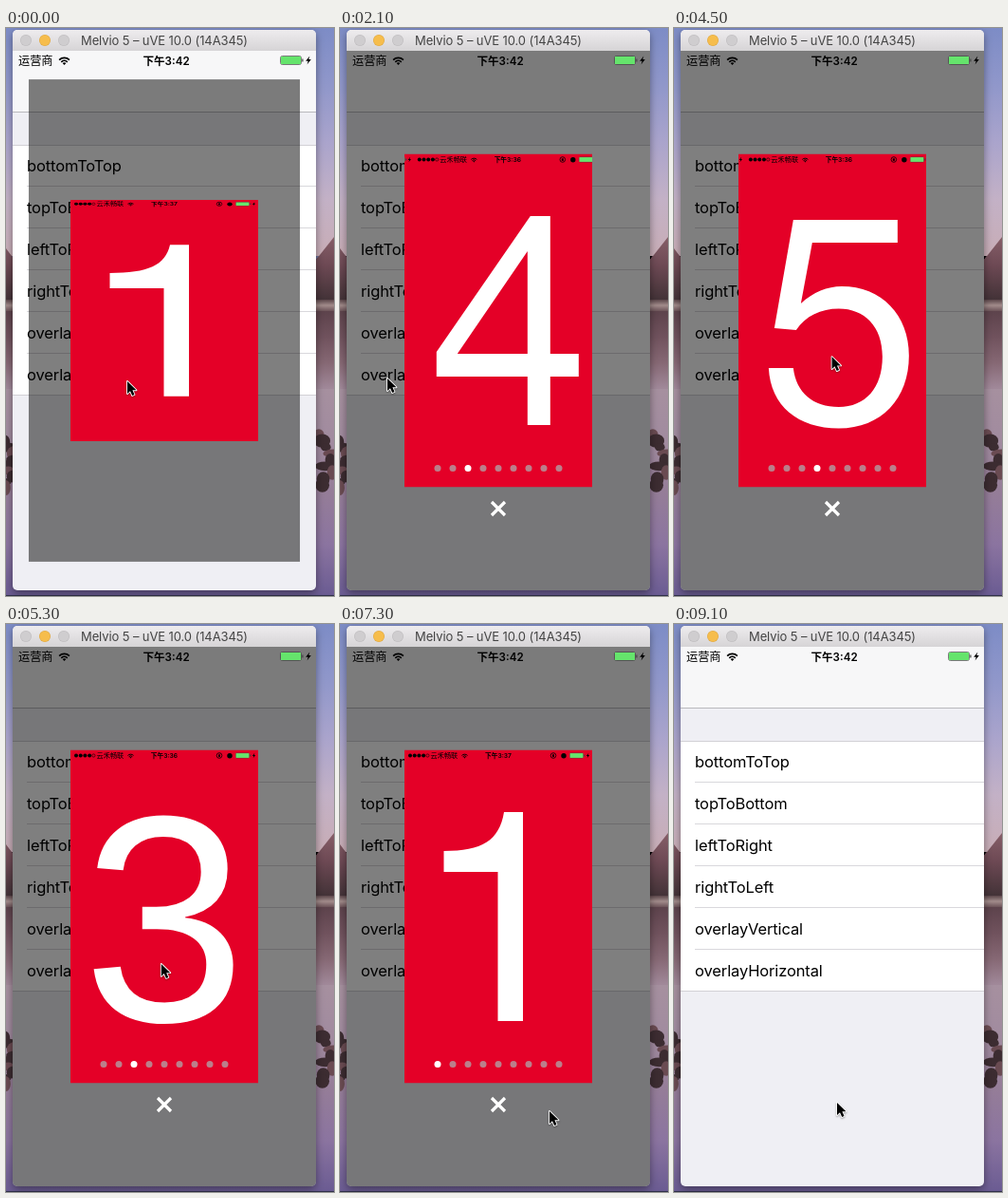
Animation, 346 px wide and 598 px high, one loop 9500 ms. Source, as an HTML page with a canvas:

```html
<!DOCTYPE html>
<html>
<head>
<meta charset="utf-8">
<style>
html, body { margin: 0; width: 100%; height: 100%; overflow: hidden; background: #8088b8; }
canvas { display: block; width: 346px; height: 598px; }
</style>
</head>
<body>
<canvas id="stage"></canvas>
<script>
const W = 346, H = 598, LOOP = 9500, STEP = 100;
const canvas = document.getElementById('stage');
const ctx = canvas.getContext('2d');
const dpr = window.devicePixelRatio || 1;
canvas.width = W * dpr;
canvas.height = H * dpr;

const SANS = 'Inter, "Noto Sans CJK SC", sans-serif';
const CJK = '"Noto Sans CJK SC", "Noto Sans CJK", sans-serif';
const CX = 167, CY = 308;
const PAGE = { x: 68, y: 132.5, w: 198, h: 351 };
const ROWS = ['bottomToTop', 'topToBottom', 'leftToRight', 'rightToLeft', 'overlayVertical', 'overlayHorizontal'];

const DIGITS = {
  1: new Path2D('M193 198H173C168 228 150 239 109.5 239V261H166.5V418H193Z'),
  4: new Path2D('M212 198H191L92 341V367H188V418H212V367H242V343H212ZM188 235V343H114Z'),
  5: new Path2D('M119 202H229V226H139L127 290C140 278 155 272 170 272C212 272 241 302 241 345' +
    'C241 390 212 421.5 167 421.5C124 421.5 95 398 93 358H119C122 384 140 399 167 399' +
    'C195 399 213 379 213 346C213 314 194 295.5 167 295.5C148 295.5 132 303 122 318L99 316Z')
};
const ARROW = new Path2D('M0 0V13L3 10.2L5.2 15L7.5 14L5.4 9.3H9.5Z');
const BOLT = new Path2D('M1.4 -4.5L-2.8 .8H-.3L-1.4 4.5L2.8 -1H.3Z');

const clamp = v => Math.max(0, Math.min(1, v));
const ease = u => .5 - .5 * Math.cos(Math.PI * clamp(u));

// Four swipes forward, ever slower, then four quick ones back
const SWIPE_MS = 420;
const forward = i => 690 + 225 * i + 150 * i * i;
const back = i => 4450 + 430 * i;
const turns = [0, 1, 2, 3];

const POINTER = [
  [0, 128, 372],
  ...turns.flatMap(i => [[forward(i), 228, 367], [forward(i) + 360, 50, 369]]),
  [3200, 230, 347],
  ...turns.flatMap(i => [[back(i), 160, 346 + 6 * i], [back(i) + 340, 285, 348 + 6 * i]]),
  [6200, 294, 371], [7300, 221, 513], [7800, 172, 504], [LOOP, 172, 504]
];

function scrollAt(t) {
  const progress = start => ease((t - start) / SWIPE_MS);
  return turns.reduce((p, i) => p + progress(forward(i)) - progress(back(i)), 0);
}

function pointerAt(t) {
  const i = Math.max(1, POINTER.findIndex(k => k[0] >= t));
  const [t0, x0, y0] = POINTER[i - 1], [t1, x1, y1] = POINTER[i];
  const u = ease((t - t0) / (t1 - t0));
  return [x0 + (x1 - x0) * u, y0 + (y1 - y0) * u];
}

function opennessAt(t) {
  if (t < 300) return 1 - .276 * (1 - t / 300) ** 2;
  return 1 - clamp((t - 8700) / 400) ** 2;
}

function rect(x, y, w, h, fill) {
  ctx.fillStyle = fill;
  ctx.fillRect(x, y, w, h);
}

function disc(x, y, r, fill) {
  ctx.fillStyle = fill;
  ctx.beginPath();
  ctx.arc(x, y, r, 0, 7);
  ctx.fill();
}

function ring(x, y, r, width) {
  ctx.strokeStyle = '#000';
  ctx.lineWidth = width;
  ctx.beginPath();
  ctx.arc(x, y, r, 0, 7);
  ctx.stroke();
}

function round(x, y, w, h, r) {
  ctx.beginPath();
  ctx.roundRect(x, y, w, h, r);
}

function text(s, x, y, font, fill = '#000', align = 'left', spacing = 0) {
  ctx.font = font;
  ctx.fillStyle = fill;
  ctx.textAlign = align;
  ctx.letterSpacing = spacing + 'px';
  ctx.fillText(s, x, y);
}

function gradient(y0, y1, ...colors) {
  const g = ctx.createLinearGradient(0, y0, 0, y1);
  colors.forEach((color, i) => g.addColorStop(i / (colors.length - 1), color));
  return g;
}

function place(x, y, k, paint) {
  ctx.save();
  ctx.translate(x, y);
  ctx.scale(k, k);
  paint();
  ctx.restore();
}

function wifi(x, y, k) {
  const from = -Math.PI * .75, to = -Math.PI * .25;
  place(x, y, k, () => {
    ctx.strokeStyle = ctx.fillStyle = '#000';
    ctx.lineWidth = 1.8;
    for (const r of [4.8, 8]) {
      ctx.beginPath();
      ctx.arc(0, 0, r, from, to);
      ctx.stroke();
    }
    ctx.beginPath();
    ctx.moveTo(0, 0);
    ctx.arc(0, 0, 2.8, from, to);
    ctx.fill();
  });
}

function bolt(x, y, k) {
  place(x, y, k, () => {
    ctx.fillStyle = '#000';
    ctx.fill(BOLT);
  });
}

function battery(x, y, w, h) {
  const inset = h / 10;
  round(x + .5, y + .5, w - 1, h - 1, h / 5);
  ctx.strokeStyle = '#444';
  ctx.lineWidth = .7;
  ctx.stroke();
  rect(x + inset, y + inset, w - 2 * inset, h - 2 * inset, '#65e46c');
  rect(x + w + .3, y + h * .35, 1.2, h * .3, '#444');
}

function rocks(x, y, count, seed) {
  const random = () => (seed = seed * 16807 % 2147483647) / 2147483647;
  for (let i = 0; i < count; i++) {
    ctx.fillStyle = i % 3 ? '#3c2c31' : '#6a4b52';
    ctx.beginPath();
    ctx.ellipse(x + 16 * (random() - .5), y + 60 * i / count, 5 + 7 * random(), 4 + 4 * random(), 0, 0, 7);
    ctx.fill();
  }
}

// Lake at dusk, seen only beside the window
function desktop() {
  rect(0, 0, W, 240, gradient(0, 240, '#7d8cc6', '#9097ca', '#aaa4cc', '#c3b1c6', '#c8adb6'));
  ctx.fillStyle = gradient(215, 285, '#8a626b', '#6d4954', '#443338');
  ctx.beginPath();
  ctx.moveTo(0, 232);
  ctx.lineTo(9, 244);
  ctx.lineTo(327, 244);
  ctx.lineTo(346, 220);
  ctx.lineTo(346, 286);
  ctx.lineTo(0, 286);
  ctx.fill();
  rect(0, 286, W, 12, gradient(286, 298, '#5b464a', '#a28c8b', '#6d5459'));
  rect(0, 298, W, 82, gradient(298, 380, '#5d434c', '#70525d', '#866874', '#a1899a'));
  rect(0, 380, W, 218, gradient(380, 598, '#a6909f', '#a18b9f', '#957d98', '#8b74a0', '#6a5b92'));
  rocks(338, 428, 9, 31);
  rocks(2, 430, 10, 77);
  rect(0, 597, W, 1, '#30304a');
}

function windowFrame() {
  ctx.save();
  ctx.shadowColor = 'rgba(0,0,0,.4)';
  ctx.shadowBlur = 9 * dpr;
  ctx.shadowOffsetY = 3 * dpr;
  round(7, 2, 320, 590, 5);
  ctx.fillStyle = '#efeff4';
  ctx.fill();
  ctx.restore();
  round(7, 2, 320, 22, [5, 5, 0, 0]);
  ctx.fillStyle = gradient(2, 24, '#eeecee', '#d6d4d6');
  ctx.fill();
  ['#cfcdcf', '#f6bd4c', '#cfcdcf'].forEach((color, i) => {
    disc(21 + 20 * i, 13, 6, i === 1 ? '#dfa943' : '#bebcbe');
    disc(21 + 20 * i, 13, 5.4, color);
  });
  text('Melvio 5 – uVE 10.0 (14A345)', CX, 17.8, '13px ' + SANS, '#444', 'center', -.1);
}

function menu() {
  rect(7, 24, 320, 64, '#f7f7f8');
  rect(7, 88, 320, 1, '#b9b9bd');
  rect(7, 123, 320, 264, '#fff');
  rect(7, 123, 320, 1, '#d2d1d6');
  rect(7, 386, 320, 1, '#d2d1d6');
  ROWS.forEach((label, i) => {
    if (i) rect(22, 122 + 44 * i, 305, 1, '#d9d8dc');
    text(label, 22, 150.7 + 44 * i, '16.5px ' + SANS, '#000', 'left', -.12);
  });
}

function statusBar() {
  text('运营商', 13, 38.7, '12.2px ' + CJK);
  wifi(61.5, 39, .95);
  text('下午3:42', 169, 38.5, '600 11.6px ' + SANS, '#000', 'center');
  battery(289, 29, 23, 10);
  bolt(319, 34, 1);
}

function page(n) {
  for (let i = 0; i < 4; i++) disc(74 + 4.7 * i, 138.5, 2, '#000');
  ring(92.4, 138.5, 1.6, .6);
  text('云禾畅联', 95.5, 141.2, '7.2px ' + CJK);
  wifi(131.5, 141.5, .54);
  text(n === 1 ? '下午3:37' : '下午3:36', CX, 141, '600 6.7px ' + SANS, '#000', 'center');
  ring(225, 138.5, 2.8, .8);
  rect(224, 137.4, 2, 2.4, '#000');
  disc(236, 138.7, 2.7, '#000');
  battery(242, 135.5, 15, 6);
  bolt(261.5, 138.5, .6);

  if (DIGITS[n]) {
    ctx.fillStyle = '#fff';
    ctx.fill(DIGITS[n], 'evenodd');
  } else {
    text(n, CX, 418, '310px "Liberation Sans", Arial, sans-serif', '#fff', 'center');
  }
}

function carousel(pos, open) {
  ctx.save();
  ctx.translate(0, CY);
  ctx.scale(1, open);
  ctx.translate(0, -CY);
  ctx.beginPath();
  ctx.rect(PAGE.x, PAGE.y, PAGE.w, PAGE.h);
  ctx.clip();
  rect(PAGE.x, PAGE.y, PAGE.w, PAGE.h, '#e40027');
  for (let i = Math.floor(pos); i <= Math.ceil(pos); i++) {
    place((i - pos) * PAGE.w, 0, 1, () => page(i + 1));
  }
  ctx.restore();
}

function controls(active) {
  for (let i = 0; i < 9; i++) disc(103 + 16 * i, 463.5, 3.5, i === active ? '#fff' : '#bb7f8b');
  ctx.strokeStyle = '#fff';
  ctx.lineWidth = 3.2;
  ctx.beginPath();
  for (const d of [-7, 7]) {
    ctx.moveTo(CX - d, 499);
    ctx.lineTo(CX + d, 513);
  }
  ctx.stroke();
}

function popup(t) {
  const open = opennessAt(t);
  if (open <= 0) return;
  const s = open ** .347;
  const pos = Math.round(scrollAt(t) * 1e4) / 1e4;
  ctx.save();
  round(7, 2, 320, 590, 5);
  ctx.clip();
  rect(CX - 160 * s, CY - 284 * s, 320 * s, 568 * s, 'rgba(0,0,0,.5)');
  ctx.restore();
  statusBar();
  carousel(pos, open);
  if (open === 1) controls(Math.floor(pos));
}

function pointer(t) {
  place(...pointerAt(t), 1, () => {
    ctx.shadowColor = 'rgba(0,0,0,.35)';
    ctx.shadowBlur = 2 * dpr;
    ctx.shadowOffsetY = dpr;
    ctx.strokeStyle = '#fff';
    ctx.lineWidth = 1.8;
    ctx.lineJoin = 'round';
    ctx.stroke(ARROW);
    ctx.shadowColor = 'transparent';
    ctx.fillStyle = '#000';
    ctx.fill(ARROW);
  });
}

function draw(now) {
  const t = Math.min(9100, Math.floor((now % LOOP) / STEP) * STEP);
  ctx.setTransform(dpr, 0, 0, dpr, 0, 0);
  desktop();
  windowFrame();
  menu();
  if (opennessAt(t) <= 0) statusBar();
  popup(t);
  pointer(t);
}

const began = performance.now();
function tick() {
  draw(performance.now() - began);
  requestAnimationFrame(tick);
}
tick();
</script>
</body>
</html>
```
